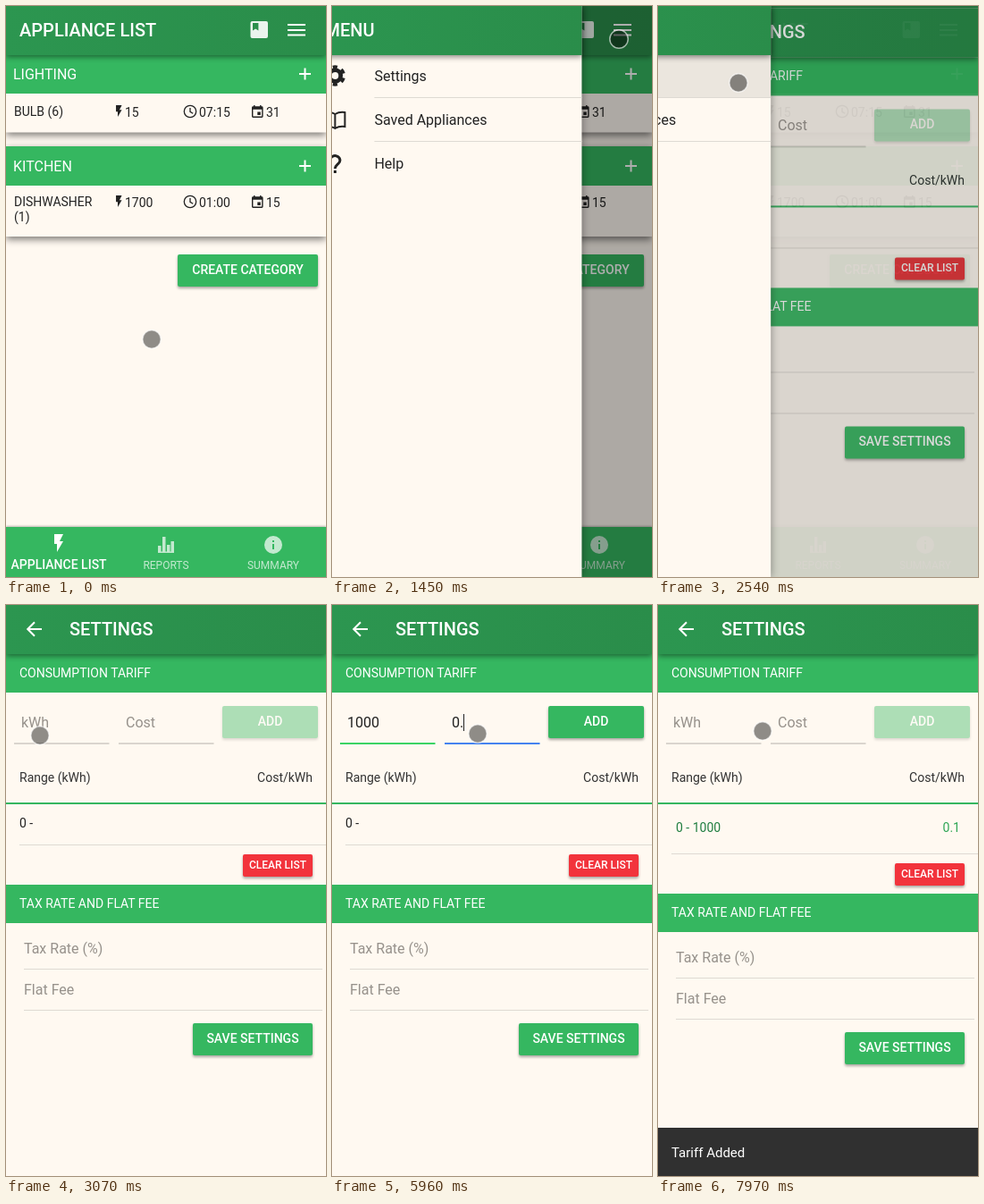
An HTML page for the animation above (8000 ms loop, 358 by 639 pixels).

```html
<!DOCTYPE html>
<html lang="en">
<head>
<meta charset="utf-8">
<title>Appliance list</title>
<style>
  html, body { margin: 0; width: 100%; height: 100%; overflow: hidden; background: #fff9f1; }
  svg { display: block; width: 358px; height: 639px; font: 14px Roboto, sans-serif; fill: #222; }
  .cream { fill: #fff9f1; }
  .green { fill: #35b760; }
  .white { fill: #fff; }
  .title { font-size: 20px; font-weight: 500; fill: #fff; }
  .big { font-size: 16px; }
  .hint { font-size: 16px; fill: #96918b; }
  .label { font-weight: 500; fill: #fff; text-anchor: middle; }
  .small { font-size: 12px; }
  .end { text-anchor: end; }
  .dim { opacity: .7; }
  .line { fill: none; stroke: #222; }
  .rule { stroke: #dedad3; }
  .light { stroke: #fff; }
  .head { fill: url(#bar); filter: drop-shadow(0 2px 3px #0007); }
  .card { fill: #fff9f1; filter: drop-shadow(0 3px 4px #0008); }
  .raised { filter: drop-shadow(0 2px 1.5px #0005); }
</style>
</head>
<body>
<svg viewBox="0 0 358 639">
  <defs>
    <linearGradient id="bar"><stop stop-color="#2c9650"/><stop offset="1" stop-color="#2a8d4a"/></linearGradient>
    <path id="bolt" d="M7 2v11h3v9l7-12h-4l4-8z"/>
    <path id="plus" class="line light" stroke-width="2" d="M-6.5 0h13M0-6.5v13"/>
    <g id="stats">
      <use href="#bolt" transform="translate(118.5 -8.2) scale(.65)"/>
      <path class="line" stroke-width="1.3" d="M199.3 0a6.7 6.7 0 1 1 13.4 0a6.7 6.7 0 1 1-13.4 0M206-4v4.3l3.2 2"/>
      <path transform="translate(272.9 -7.8) scale(.7)" d="M17 12h-5v5h5zM16 1v2H8V1H6v2H5a2 2 0 0 0-2 2v14a2 2 0 0 0 2 2h14a2 2 0 0 0 2-2V5a2 2 0 0 0-2-2h-1V1zM19 19H5V8h14z"/>
    </g>
  </defs>

  <g id="list">
    <rect class="cream" width="358" height="639"/>
    <rect class="card" y="56" width="358" height="85.5"/>
    <rect class="green" y="55" width="358" height="43"/>
    <text class="big white" x="8" y="82">LIGHTING</text>
    <use href="#plus" x="334.5" y="76"/>
    <text x="9" y="123">BULB (6)</text>
    <use href="#stats" y="118"/>
    <text x="133" y="124">15</text><text x="216" y="124">07:15</text><text x="291" y="124">31</text>

    <rect class="card" y="157" width="358" height="101"/>
    <rect class="green" y="157" width="358" height="44"/>
    <text class="big white" x="8" y="185">KITCHEN</text>
    <use href="#plus" x="334.5" y="179"/>
    <text x="9" y="224">DISHWASHER</text><text x="9" y="241">(1)</text>
    <use href="#stats" y="219"/>
    <text x="133" y="225">1700</text><text x="216" y="225">01:00</text><text x="291" y="225">15</text>

    <rect class="green raised" x="192" y="278" width="157" height="36" rx="2"/>
    <text class="label" x="270.5" y="300">CREATE CATEGORY</text>

    <rect class="head" width="358" height="55"/>
    <text class="title" x="15" y="34">APPLIANCE LIST</text>
    <path class="white" opacity=".9" fill-rule="evenodd" d="M275.500 17h15.500a2 2 0 0 1 2 2v15a2 2 0 0 1-2 2h-15.500a2 2 0 0 1-2-2v-15a2 2 0 0 1 2-2zM276 19v8.500l3.200-2 3.200 2v-8.500z"/>
    <path class="line light" stroke-width="2" d="M315 21h20M315 27h20M315 32.500h20"/>

    <rect class="green" y="583" width="358" height="56" style="filter:drop-shadow(0 -1px 1px #0004)"/>
    <use href="#bolt" class="white" x="47" y="589"/>
    <text class="label" x="59" y="630">APPLIANCE LIST</text>
    <g class="dim">
      <path class="white" d="M170 604h3.500v8h-3.500zM175 594h3.500v18h-3.500zM180 603h3.500v9h-3.500zM184.500 599h3.500v13h-3.500zM170 610.500h18v1.500h-18z"/>
      <text class="small white" text-anchor="middle" x="179" y="630">REPORTS</text>
      <circle class="white" cx="299" cy="603" r="10"/>
      <path class="line" style="stroke:#35b760" stroke-width="2" d="M299 602v6M299 598v2"/>
      <text class="small white" text-anchor="middle" x="299" y="630">SUMMARY</text>
    </g>
  </g>

  <g id="settings">
    <rect class="cream" width="358" height="639"/>
    <rect class="green" y="55" width="358" height="43"/>
    <text class="white" x="15" y="81">CONSUMPTION TARIFF</text>
    <rect class="head" width="358" height="55"/>
    <path class="line light" stroke-width="2.100" d="M40 27H24.500M32 19.300L24.300 27l7.700 7.700"/>
    <text class="title" x="71" y="34">SETTINGS</text>

    <g id="fields"></g>
    <g id="add">
      <rect class="green raised" x="242" y="113" width="107" height="36" rx="2"/>
      <text class="label" x="295.500" y="135">ADD</text>
    </g>

    <text x="15" y="198" fill="#333">Range (kWh)</text>
    <text class="end" x="343" y="198" fill="#333">Cost/kWh</text>
    <rect class="green" y="221" width="358" height="2"/>
    <text id="empty" x="15" y="249">0 -</text>
    <g id="tariff">
      <text x="20" y="254" fill="#217f42">0 - 1000</text>
      <text class="end" x="338" y="254" fill="#2fa656">0.1</text>
    </g>

    <g id="rest">
      <path class="rule" d="M15 268.500H358M20 407.500H354M20 453.500H354"/>
      <rect class="raised" fill="#f2333c" x="265" y="279" width="78" height="25" rx="2"/>
      <text class="label small" x="304" y="295">CLEAR LIST</text>
      <rect class="green" y="313" width="358" height="43"/>
      <text class="white" x="15" y="339">TAX RATE AND FLAT FEE</text>
      <text class="hint" x="20" y="390">Tax Rate (%)</text>
      <text class="hint" x="20" y="436">Flat Fee</text>
      <rect class="green raised" x="209" y="468" width="134" height="36" rx="2"/>
      <text class="label" x="276" y="490">SAVE SETTINGS</text>
    </g>
    <g id="toast">
      <rect y="585" width="358" height="54" fill="#303030"/>
      <text class="white" x="15" y="618" font-size="15">Tariff Added</text>
    </g>
  </g>

  <rect id="shade" width="358" height="639" fill="#000"/>
  <g id="menu">
    <rect class="cream" width="303" height="639" style="filter:drop-shadow(0 0 5px #0006)"/>
    <rect id="pressed" y="55" width="303" height="48" opacity=".09"/>
    <rect class="head" width="303" height="55"/>
    <text class="title" x="15" y="34">MENU</text>
    <path class="rule" d="M71 102.500H303M71 151.500H303"/>
    <g class="line" stroke-width="2">
      <circle cx="27" cy="78" r="6.300" stroke-width="4.800"/>
      <circle cx="27" cy="78" r="9.900" stroke-width="3.600" pathLength="12" stroke-dasharray="1" stroke-dashoffset="-.5"/>
      <path d="M27 121q-5-3-11-2v16q6-1 11 2q5-3 11-2v-16q-6-1-11 2v16"/>
      <path stroke-width="3" d="M21.500 173a5.500 5 0 1 1 9 3.500c-2 1.800-3.500 2.500-3.500 5.500M27 184v3"/>
    </g>
    <text class="big" x="71" y="84">Settings</text>
    <text class="big" x="71" y="133">Saved Appliances</text>
    <text class="big" x="71" y="182">Help</text>
  </g>
  <circle id="cursor" r="10.200" fill="#000" fill-opacity=".44" stroke="#fff" stroke-opacity=".6" stroke-width="1.500"/>
</svg>

<script>
const LOOP = 8000, ADDED = 7350;
const el = id => document.getElementById(id);
const smooth = u => u * u * (3 - 2 * u);
const easeIn = u => u * u;
const easeOut = u => 1 - (1 - u) ** 2;
const settle = u => 1 - (1 - u) ** 4;
const span = (t, from, to) => Math.min(1, Math.max(0, (t - from) / (to - from)));
const move = (node, x, y) => node.setAttribute('transform', `translate(${x} ${y})`);
const show = (node, on) => node.setAttribute('visibility', on ? 'inherit' : 'hidden');

// time, x, y, easing of the way there
const route = [
  [0, 163, 373], [230, 163, 373], [1070, 321, 37], [1600, 321, 37],
  [1760, 242, 65, easeIn], [1990, 90, 86, easeOut], [2770, 90, 86], [3070, 38, 146],
  [4645, 38, 146], [5030, 163, 144], [6575, 163, 144], [7030, 270, 142],
  [7420, 270, 142], [7970, 117, 141], [LOOP, 117, 141]
];

const fields = [
  { x: 17, hint: 'kWh', value: '1000', focus: 3320, blur: 5180, keys: [3620, 4080, 4250, 4400] },
  { x: 134, hint: 'Cost', value: '0.1', focus: 5180, blur: ADDED, keys: [5560, 5960, 6420] }
];
el('fields').innerHTML = fields.map(f => `<g>
  <rect x="${f.x - 8}" y="154" width="106.500" height="2"/>
  <text class="hint" x="${f.x}" y="137">${f.hint}</text>
  <text class="big" x="${f.x}" y="137"></text>
  <rect y="122" width="1" height="19"/></g>`).join('');
fields.forEach((f, i) => f.parts = el('fields').children[i].children);

function drawField(f, t) {
  const [line, hint, text, caret] = f.parts;
  const typed = t < ADDED ? f.keys.filter(k => k <= t).length : 0;
  const focused = t >= f.focus && t < f.blur;
  const lastInput = typed ? f.keys[typed - 1] : f.focus;
  text.textContent = f.value.slice(0, typed);
  show(hint, !typed);
  line.setAttribute('fill', focused ? '#4583ef' : typed ? '#3bd464' : '#dad5ce');
  show(caret, focused && (t - lastInput) % 1000 < 500);
  caret.setAttribute('x', Math.round(f.x - .5 + text.getComputedTextLength()));
}

function draw(now) {
  const t = now % LOOP, added = t >= ADDED;

  const open = settle(span(t, 1300, 1620)) - smooth(span(t, 2392, 2660));
  move(el('menu'), 303 * (open - 1), 0);
  show(el('menu'), open > 0);
  show(el('pressed'), t >= 2310);
  el('shade').setAttribute('opacity', .35 * open);

  const enter = settle(span(t, 2400, 2680));
  move(el('settings'), 0, 40 * (1 - enter));
  el('settings').setAttribute('opacity', enter);

  fields.forEach(f => drawField(f, t));
  el('add').setAttribute('opacity', t >= 5560 && !added ? 1 : .4);
  show(el('empty'), !added);
  show(el('tariff'), added);
  move(el('rest'), 0, added ? 10 : 0);
  show(el('toast'), added);
  move(el('toast'), 0, 54 * (1 - settle(span(t, ADDED, 7750))));

  const i = route.findIndex(p => p[0] > t);
  const [t0, x0, y0] = route[i - 1], [t1, x1, y1, ease = smooth] = route[i];
  const u = ease(span(t, t0, t1));
  move(el('cursor'), x0 + (x1 - x0) * u, y0 + (y1 - y0) * u);
  requestAnimationFrame(draw);
}
requestAnimationFrame(draw);
</script>
</body>
</html>
```
